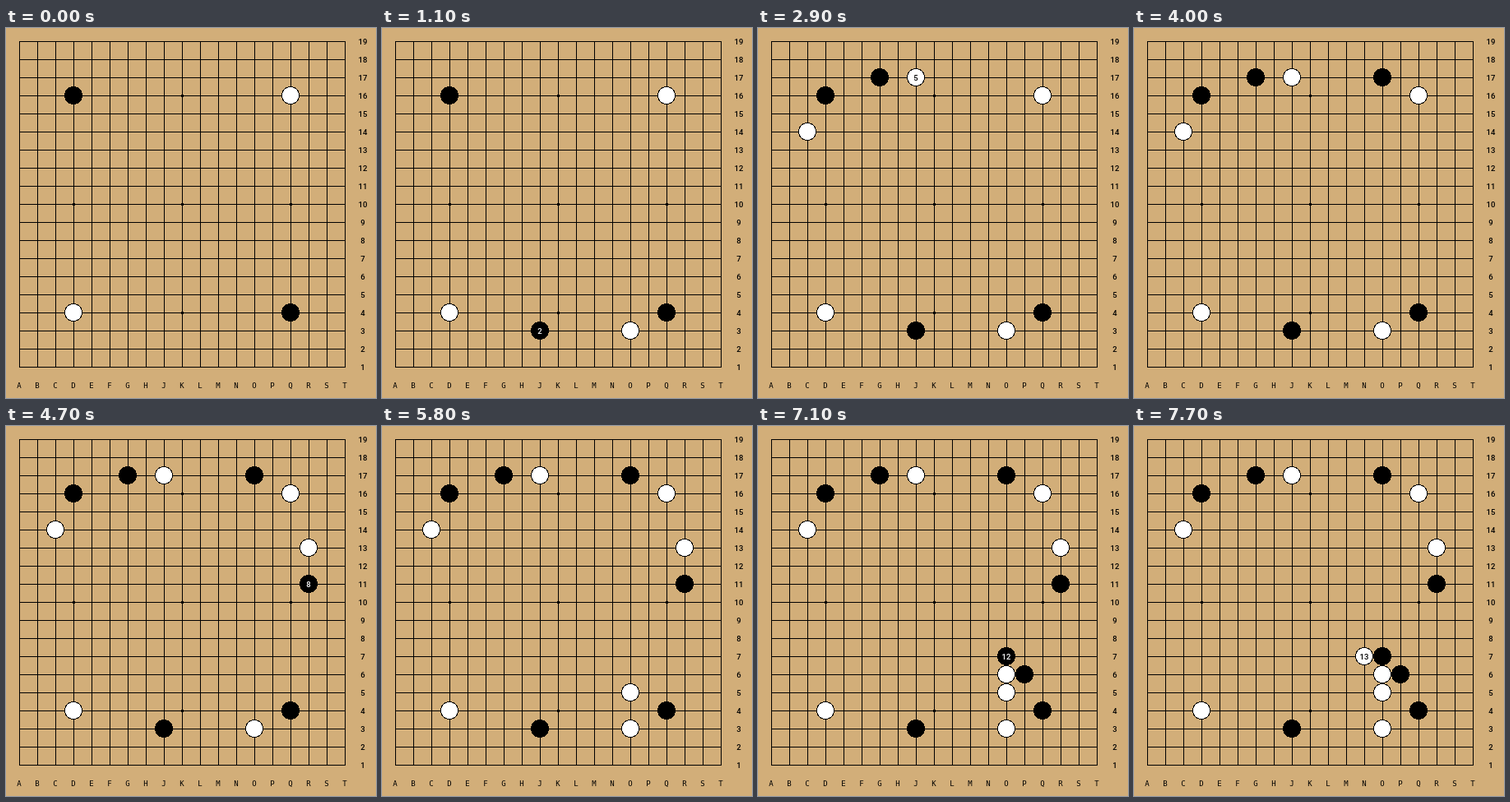
An HTML page with a canvas that plays this animation: 450 by 450 pixels, repeating every 8 s.

```html
<!DOCTYPE html>
<html lang="en">
<head>
<meta charset="utf-8">
<style>
  html, body { margin: 0; height: 100%; overflow: hidden; background: #d2ae79; }
  canvas { display: block; }
</style>
</head>
<body>
<canvas id="board" width="450" height="450"></canvas>
<script>
const ctx = document.getElementById('board').getContext('2d');
const COLUMNS = 'ABCDEFGHJKLMNOPQRST';
const CELL = 22, EDGE = 16, SIZE = 19;
const LOOP = 8000, FIRST = 500, STEP = 600, LABEL_TIME = 500;
const DIGITS = '500 9.5px Roboto, sans-serif';
const LETTERS = '9px "DejaVu Sans Mono", monospace';

const setup = ['D16', 'Q16', 'Q4', 'D4'];   // black, white, black, white
const moves = ['O3', 'J3', 'C14', 'G17', 'J17', 'O17', 'R13',
               'R11', 'O5', 'P6', 'O6', 'O7', 'N7'];   // white starts

const colX = i => EDGE + i * CELL;
const rowY = n => EDGE + (SIZE - n) * CELL;
const locate = p => [colX(COLUMNS.indexOf(p[0])), rowY(+p.slice(1))];

function text(value, x, y, font, color = '#000') {
  ctx.font = font;
  ctx.textAlign = 'center';
  ctx.fillStyle = color;
  ctx.fillText(value, x, y);
}

// Hard-edged disc, filled one pixel row at a time
function disc(x, y, r, color) {
  ctx.fillStyle = color;
  for (let dy = -r; dy < r; dy++) {
    const half = Math.round(Math.sqrt(r * r - (dy + 0.5) ** 2));
    ctx.fillRect(x - half, y + dy, 2 * half, 1);
  }
}

function stone(point, white, label) {
  const [x, y] = locate(point);
  disc(x, y, 11, '#000');
  if (white) disc(x, y, 10, '#fff');
  if (label) text(label, x, y + 4, DIGITS, white ? '#000' : '#fff');
}

function drawBoard() {
  ctx.fillStyle = '#d2ae79';
  ctx.fillRect(0, 0, 450, 450);
  const length = (SIZE - 1) * CELL + 1;
  for (let i = 0; i < SIZE; i++) {
    const p = colX(i);
    ctx.fillStyle = '#000';
    ctx.fillRect(p, EDGE, 1, length);
    ctx.fillRect(EDGE, p, length, 1);
    text(COLUMNS[i], p, 438, LETTERS);
    text(SIZE - i, 434, p + 4, DIGITS);
  }
  ctx.fillStyle = '#000';
  for (const i of [3, 9, 15])
    for (const j of [3, 9, 15]) ctx.fillRect(colX(i) - 1, colX(j) - 1, 3, 3);
}

function frame(now) {
  const t = now % LOOP;
  drawBoard();
  setup.forEach((p, i) => stone(p, i % 2 === 1));
  moves.forEach((p, i) => {
    const age = t - FIRST - i * STEP;
    if (age >= 0) stone(p, i % 2 === 0, age < LABEL_TIME && i + 1);
  });
  requestAnimationFrame(frame);
}

frame(0);
</script>
</body>
</html>
```
